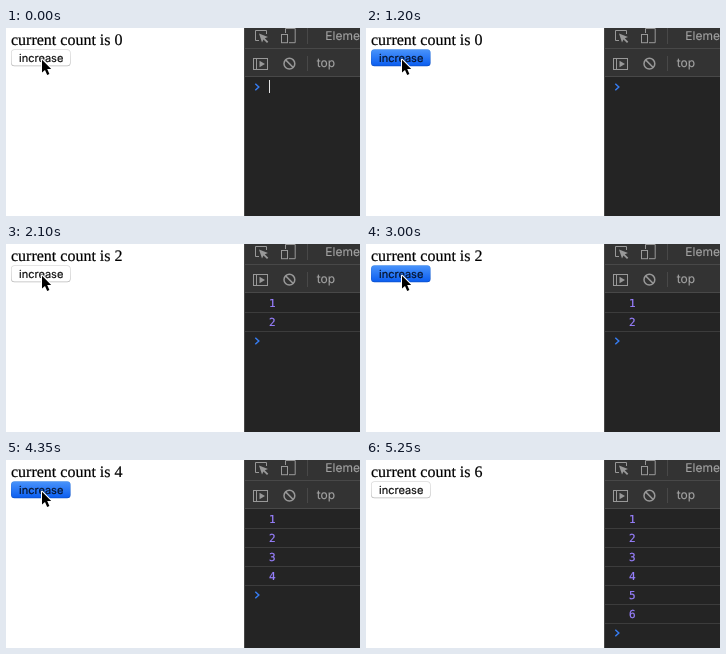
Recreate the animation shown at these times as an HTML page with a canvas. Size 354 by 188 pixels, loop 5850 ms.

```html
<!DOCTYPE html>
<html lang="en">
<head>
<meta charset="utf-8">
<title>Counter with console</title>
<style>
html, body { margin: 0; width: 100%; height: 100%; overflow: hidden; background: #fff; }
canvas { display: block; width: 354px; height: 188px; }
</style>
</head>
<body>
<canvas id="stage" width="354" height="188"></canvas>
<script>
const ctx = document.getElementById('stage').getContext('2d');
ctx.textRendering = 'geometricPrecision';
const LOOP = 5850;
const PRESS_TIME = 150;
const presses = [1200, 1950, 3000, 3600, 4350, 4800];
const ROW = 19;
const UI = 'Inter, "Liberation Sans", sans-serif';
const MONO = '"DejaVu Sans Mono", monospace';
const SERIF = '"Liberation Serif", serif';

function rect(x, y, w, h, color) {
  ctx.fillStyle = color;
  ctx.fillRect(x, y, w, h);
}

// A thin outline in the text colour gives slightly heavier strokes.
function text(str, x, y, font, color, weight = 0.2) {
  ctx.font = font;
  ctx.fillStyle = ctx.strokeStyle = color;
  ctx.lineWidth = weight;
  ctx.fillText(str, x, y);
  ctx.strokeText(str, x, y);
}

function line(points, color, width = 1) {
  ctx.beginPath();
  points.forEach(([x, y]) => ctx.lineTo(x, y));
  ctx.strokeStyle = color;
  ctx.lineWidth = width;
  ctx.stroke();
}

function shape(points, color) {
  ctx.beginPath();
  points.forEach(([x, y]) => ctx.lineTo(x, y));
  ctx.closePath();
  ctx.fillStyle = color;
  ctx.fill();
}

function box(x, y, w, h, r, color) {
  ctx.beginPath();
  ctx.roundRect(x, y, w, h, r);
  ctx.fillStyle = color;
  ctx.fill();
}

function gradient(top, bottom) {
  const g = ctx.createLinearGradient(0, 21, 0, 38);
  g.addColorStop(0, top);
  g.addColorStop(1, bottom);
  return g;
}

function drawButton(pressed) {
  const border = pressed ? gradient('#4a91ee', '#0b4fc9') : gradient('#dcdcdc', '#b8b8b8');
  const face = pressed ? gradient('#4b95fb', '#0a5df0') : '#fff';
  box(5, 21.3, 59.6, 16.9, 3.5, border);
  box(5.6, 21.9, 58.4, 15.6, 3, face);
  text('increase', 13, 34.3, '11px ' + UI, pressed ? '#06142e' : '#111');
}

function drawPointer(x, y) {
  ctx.save();
  ctx.translate(x, y);
  const arrow = [[1, 1.8], [1, 14.6], [4, 11.9], [6.2, 17], [8.4, 16], [6.2, 11.1], [10.2, 11]];
  ctx.beginPath();
  arrow.forEach(([px, py]) => ctx.lineTo(px, py));
  ctx.closePath();
  ctx.lineJoin = 'round';
  ctx.lineWidth = 2;
  ctx.strokeStyle = '#fff';
  ctx.stroke();
  ctx.fillStyle = '#000';
  ctx.fill();
  ctx.restore();
}

function drawToolbar() {
  const icon = '#989898';
  rect(238, 0, 116, 188, '#242424');
  rect(238, 0, 116, 48, '#333333');
  rect(238, 20, 116, 1, '#484848');
  rect(238, 48, 116, 1, '#484848');
  rect(238, 0, 1, 188, '#484848');
  rect(301, 0, 1, 16, '#484848');
  rect(301, 28, 1, 15, '#484848');

  // Element picker
  line([[253, 12.5], [249.5, 12.5], [249.5, 2.5], [260.5, 2.5], [260.5, 6]], icon);
  shape([[253, 5.5], [262, 9], [258.8, 10.2], [262.3, 13.7], [261, 15], [257.5, 11.5], [256, 14.5]], icon);

  // Device switch
  line([[279.5, 5], [279.5, 0.5], [289.2, 0.5], [289.2, 14.7], [283, 14.7]], icon);
  ctx.strokeRect(275.5, 6.5, 6, 8.2);

  // Sidebar toggle
  ctx.strokeRect(247.5, 30.5, 14, 11);
  line([[250.5, 30.5], [250.5, 41.5]], icon);
  shape([[253.5, 32.7], [259, 36], [253.5, 39.3]], icon);

  // Clear
  ctx.beginPath();
  ctx.arc(283.4, 35.7, 5.4, 0, Math.PI * 2);
  ctx.lineWidth = 1.5;
  ctx.stroke();
  line([[279.6, 31.9], [287.2, 39.5]], icon, 1.5);

  text('Elements', 319.3, 12, '12px ' + UI, '#a3a3a3', 0.1);
  text('top', 310.7, 39, '12px ' + UI, '#a3a3a3', 0.1);
}

function drawConsole(count, caret) {
  for (let i = 0; i < count; i++) {
    text(i + 1, 263, 63 + i * ROW, '11px ' + MONO, '#9980ff');
    rect(239, 68 + i * ROW, 115, 1, '#3c3c3c');
  }
  const y = 59 + count * ROW;
  line([[249.3, y - 3.2], [252.8, y], [249.3, y + 3.2]], '#367cf1', 1.5);
  if (caret) rect(263, 52, 1, 13, '#e4e4e4');
}

function draw(t) {
  const count = presses.filter(p => t >= p + PRESS_TIME).length;
  const pressed = presses.some(p => t >= p && t < p + PRESS_TIME);
  const caret = t < 600 || (t >= 1050 && t < 1200);

  rect(0, 0, 354, 188, '#fff');
  text('current count is ' + count, 5, 17, '16px ' + SERIF, '#000');
  drawButton(pressed);
  drawToolbar();
  drawConsole(count, caret);
  if (t < 5100) drawPointer(35, 30);
  else if (t < 5250) drawPointer(151, 95);
}

const start = performance.now();
function tick() {
  draw((performance.now() - start) % LOOP);
  requestAnimationFrame(tick);
}
tick();
</script>
</body>
</html>
```
